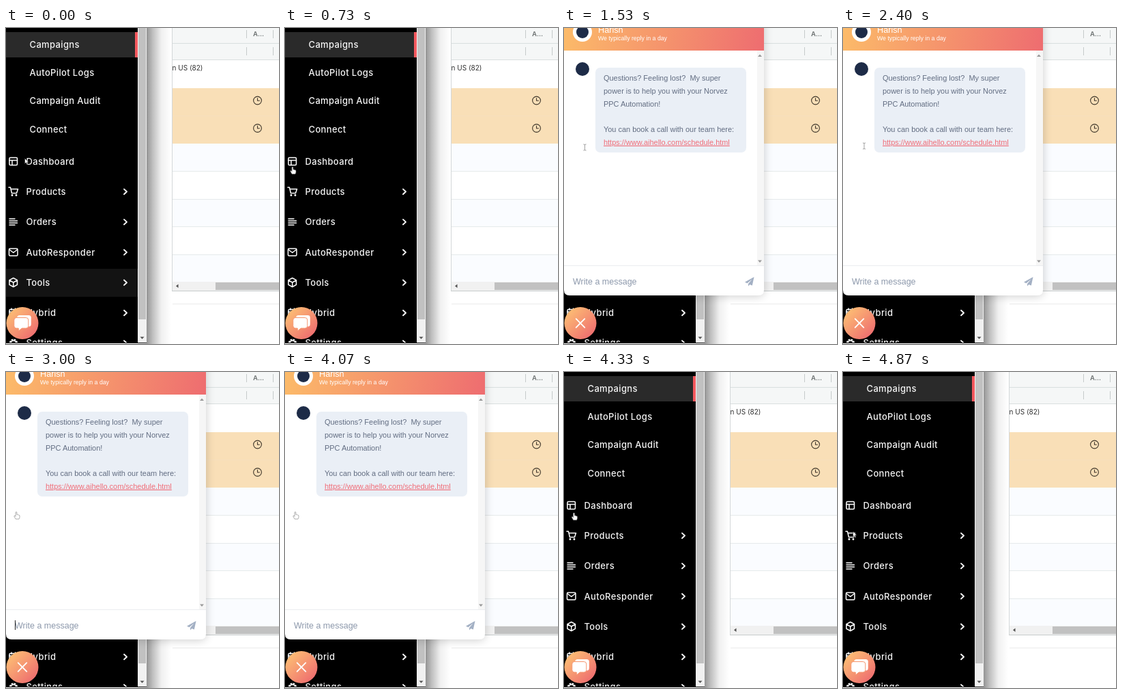
Animation of 400x462 px, one loop 4.94 s. Source, as an HTML page:

```html
<!DOCTYPE html>
<html lang="en">
<head>
<meta charset="utf-8">
<title>Help chat</title>
<style>
  html, body { margin: 0; width: 100%; height: 100%; overflow: hidden; background: #fff; }
  svg { display: block; width: 100%; height: 100%; }
  .nav { font: 500 13px Inter, sans-serif; letter-spacing: .35px; fill: #f4f4f4; }
  .chat { font-family: "Liberation Sans", Arial, sans-serif; }
  .line { fill: none; stroke: #fff; stroke-width: 1.5; stroke-linecap: round; stroke-linejoin: round; }
</style>
</head>
<body>
<svg viewBox="0 0 400 462" xmlns="http://www.w3.org/2000/svg">
  <defs>
    <linearGradient id="head" gradientUnits="userSpaceOnUse" x1="0" y1="0" x2="285" y2="60">
      <stop offset="0" stop-color="#fcbb69"/><stop offset="1" stop-color="#ee6d70"/>
    </linearGradient>
    <linearGradient id="warm" x1=".1" y1=".1" x2=".9" y2=".9">
      <stop offset="0" stop-color="#fdbf74"/><stop offset="1" stop-color="#ee6c6f"/>
    </linearGradient>
    <linearGradient id="shade">
      <stop offset="0" stop-opacity=".42"/><stop offset=".25" stop-opacity=".25"/>
      <stop offset=".6" stop-opacity=".06"/><stop offset="1" stop-opacity="0"/>
    </linearGradient>
    <filter id="soft" x="-20%" y="-20%" width="140%" height="140%"><feGaussianBlur stdDeviation="7"/></filter>
    <clipPath id="side"><rect width="193" height="460"/></clipPath>
  </defs>

  <rect width="400" height="462" fill="#fff"/>
  <g id="table"></g>
  <rect x="206" width="36" height="462" fill="url(#shade)"/>

  <rect width="206" height="461"/>
  <g clip-path="url(#side)">
    <rect y="6" width="193" height="37" fill="#2a2a2a"/>
    <rect x="189" y="6" width="4" height="37" fill="#f4595f"/>
    <rect id="hover" y="352" width="193" height="41" fill="#131313"/>
    <g id="menu"></g>
    <g class="line">
      <rect x="5" y="189.500" width="11.500" height="11" rx="1.500"/>
      <path d="M5 193.500H16.500M9 193.500V200.500"/>
      <path d="M4 233H6.500L8.500 241.500H15.500L17.500 235.500H7.500"/>
      <circle cx="9" cy="244.500" r=".7"/><circle cx="15" cy="244.500" r=".7"/>
      <path d="M5 279H13M5 282H16.500M5 285H16.500M5 288H13"/>
      <rect x="4.500" y="322.500" width="12.500" height="10.500" rx="1.500"/>
      <path d="M5 324L10.800 328.500L16.500 324"/>
      <path d="M10.800 365.500L16.500 368.700V375.300L10.800 378.500L5 375.300V368.700ZM5.300 369L10.800 372L16.200 369M10.800 372V378"/>
      <rect x="5" y="411.500" width="11.500" height="11" rx="1.500"/>
      <path d="M8 410V412.500M13.500 410V412.500M5 415H16.500"/>
      <circle cx="11" cy="460.500" r="4.800" stroke-width="2.500" stroke-dasharray="2.600 1.170" stroke-linecap="butt"/>
      <circle cx="11" cy="460.500" r="3.600"/>
    </g>
  </g>
  <rect x="193" width="13" height="460" fill="#f1f1f1"/>
  <rect x="194" width="11" height="426" fill="#c1c1c1"/>
  <path d="M196.500 451.500H202.500L199.500 454.800Z" fill="#505050"/>

  <g id="panel">
    <rect x="3" y="-20" width="290" height="412" rx="8" opacity=".2" filter="url(#soft)"/>
    <path d="M0 -20H293V383Q293 391 285 391H8Q0 391 0 383Z" fill="#fff"/>
    <rect y="-20" width="293" height="53" fill="url(#head)"/>
    <circle cx="27" cy="6" r="14" fill="#fff"/>
    <circle cx="27" cy="6" r="9" fill="#1d2b47"/>
    <circle cx="27" cy="60" r="10" fill="#1d2b47"/>
    <g class="chat" fill="#fff">
      <text x="50" y="7.300" font-size="12.700">Harish</text>
      <text x="50" y="17.500" font-size="8.750">We typically reply in a day</text>
    </g>
    <rect x="46" y="58" width="221" height="124" rx="7" fill="#eaeff6"/>
    <g id="message" class="chat" font-size="10.950" fill="#626d82"></g>
    <rect x="283" y="33" width="10" height="314" fill="#f6f6f6"/>
    <path d="M284 42H290L287 38.500ZM284 339.500H290L287 343Z" fill="#9a9a9a"/>
    <rect y="347" width="293" height="1" fill="#ebedf0"/>
    <text class="chat" x="13" y="374.500" font-size="12.500" fill="#8c98ab">Write a message</text>
    <path d="M278.500 364L265 371.500L268.500 373.200L275.500 367.300L270 374V377.500L272.200 375L275.800 376.500Z" fill="#a3b0c4"/>
    <rect id="caret" x="13" y="363" width="1" height="14" fill="#222"/>
  </g>

  <circle cx="24" cy="431.500" r="23.500" fill="url(#warm)"/>
  <g id="bubbles" fill="#fff">
    <rect x="-8" y="-11.500" width="20.500" height="16.500" rx="3.500"/>
    <path d="M-9 -8H5Q8.500 -8 8.500 -4.500V4Q8.500 7.500 5 7.500H-1L-6 11.500V7.500H-9Q-12.500 7.500 -12.500 4V-4.500Q-12.500 -8 -9 -8Z" stroke="#f5956f" stroke-width="1"/>
  </g>
  <path id="cross" d="M-6.300 -6.300L6.300 6.300M6.300 -6.300L-6.300 6.300" fill="none" stroke="#fff" stroke-width="1.900" stroke-linecap="round"/>

  <g id="cursor">
    <path id="arrow" d="M0 0V8L1.900 6.300L3.200 9.200L4.600 8.600L3.400 5.700H5.800Z" fill="#fff" stroke="#111" stroke-width=".6"/>
    <path id="hand" d="M-.9 .6Q0 -.8 .9 .6V4Q2 3.300 2.600 4.400Q3.600 3.800 4 4.900Q5 4.600 5 5.800V7.500Q5 9 4 10.500H-.8L-3 6.800Q-3.300 5.300 -2 5.600L-.9 6.700Z" fill="#fff" stroke="#777" stroke-width=".6"/>
    <path id="beam" d="M-2 -4.500Q0 -4.500 0 -3.500Q0 -4.500 2 -4.500M0 -3.500V3.500M-2 4.500Q0 4.500 0 3.500Q0 4.500 2 4.500" fill="none" stroke="#888" stroke-width=".8"/>
  </g>
</svg>

<script>
const LOOP = 4940, STEP = 1000 / 15;
const $ = id => document.getElementById(id);
const rect = (x, y, w, h, fill) => `<rect x="${x}" y="${y}" width="${w}" height="${h}" fill="${fill}"/>`;
const text = (x, y, s, more = '') => `<text x="${x}" y="${y}" ${more}>${s}</text>`;
const clamp = v => Math.max(0, Math.min(1, v));
const ramp = (t, a, b) => clamp((t - a) / (b - a));
const smooth = p => p * p * (3 - 2 * p);
const within = (t, a, b) => t >= a && t < b;

function buildMenu() {
  const subs = ['Campaigns', 'AutoPilot Logs', 'Campaign Audit', 'Connect'];
  const mains = ['Dashboard', 'Products', 'Orders', 'AutoResponder', 'Tools', 'Hybrid', 'Settings'];
  let out = subs.map((s, i) => text(34.5, 28.7 + i * 41.3, s, 'class="nav"')).join('');
  mains.forEach((s, i) => {
    const y = 195 + i * 44.3;
    out += text(29.5, y + 4.6, s, 'class="nav"');
    if (i) out += `<path d="M173 ${y - 3.7}L177 ${y}L173 ${y + 3.7}" class="line" style="stroke-width:1.9"/>`;
  });
  $('menu').innerHTML = out;
}

function buildTable() {
  let out = rect(244, 0, 156, 46, '#f5f7f7') + rect(244, 22, 156, 1, '#d9dfdf') + rect(244, 46, 156, 1, '#d9dfdf');
  for (const x of [352, 391]) out += rect(x, 3, 1, 12, '#c5caca') + rect(x, 28, 1, 12, '#c5caca');
  out += text(362, 12, 'A...', 'font-family="Inter, sans-serif" font-size="9.5" font-weight="600" fill="#6b7070"');
  out += text(243.5, 61.5, 'n US (82)', 'font-family="Inter, sans-serif" font-size="10" fill="#333"');
  out += rect(244, 88, 156, 81, '#f9dfb7') + rect(244, 128, 156, 1, '#f7dfbd');
  for (const y of [106, 146.5])
    out += `<g fill="none" stroke="#40382c" stroke-width="1.1"><circle cx="368.500" cy="${y}" r="5.900"/><path d="M368.500 ${y - 3.8}V${y + .3}H371.800"/></g>`;
  for (let i = 0; i < 5; i++) {
    const y = 169 + i * 40.4;
    out += rect(244, y, 156, 40.4, i % 2 ? '#fff' : '#fafcff');
    if (i) out += rect(244, Math.round(y), 156, 1, '#e6eaeb');
  }
  out += rect(244, 371, 156, 13, '#f1f1f1') + rect(307, 372, 93, 11, '#c1c1c1');
  out += '<path d="M252.500 374.500V380L249 377.200Z" fill="#505050"/>';
  out += rect(243, 0, 1, 385, '#d3d7d8') + rect(243, 384, 157, 1, '#c6cbcc') + rect(244, 403, 156, 1, '#ebebeb');
  $('table').innerHTML = out;
}

function buildMessage() {
  const lines = ['Questions? Feeling lost?&#160; My super', 'power is to help you with your Norvez',
    'PPC Automation!', '', 'You can book a call with our team here:'];
  $('message').innerHTML = lines.map((s, i) => text(58, 77 + i * 18.75, s)).join('') +
    text(58, 170.8, 'https://www.aihello.com/schedule.html', 'fill="#f06d78" text-decoration="underline"');
}

// start, end, x, y: where the pointer travels to
const moves = [
  [0, 460, 11, 203], [1200, 1530, 30.5, 174.5], [1670, 1860, 31, 172.5],
  [2540, 2990, 15, 204.5], [4130, 4190, 14.5, 206], [4400, 4730, 14.5, 233]
];

function pointer(t) {
  let x = 27.5, y = 190.5;
  for (const [a, b, tx, ty] of moves) {
    const p = smooth(ramp(t, a, b));
    x += (tx - x) * p;
    y += (ty - y) * p;
  }
  return [x, y];
}

function shape(t) {
  if (within(t, 260, 1330) || within(t, 2860, 4530)) return 'hand';
  if (within(t, 1460, 2660)) return 'beam';
  return 'arrow';
}

function place(id, x, y, scale, turn = 0) {
  $(id).setAttribute('transform', `translate(${x} ${y}) rotate(${turn}) scale(${scale})`);
}

function draw(now) {
  const t = Math.floor((now % LOOP + 5) / STEP) * STEP;

  const opening = 1 - (1 - ramp(t, 733, 1133)) ** 2;
  const open = opening * (1 - ramp(t, 4067, 4267));
  $('panel').setAttribute('opacity', open);
  $('panel').setAttribute('transform', `translate(0 ${10 * (1 - open)})`);
  $('hover').setAttribute('opacity', 1 - ramp(t, 0, 330));

  const caret = within(t, 1790, 2390) || within(t, 2920, 3395) || within(t, 3925, 4060);
  $('caret').setAttribute('opacity', caret ? 1 : 0);

  const swap = ramp(t, 733, 1000) * (1 - ramp(t, 4067, 4333));
  place('bubbles', 24.3, 431.5, 1 - swap * .6);
  $('bubbles').setAttribute('opacity', clamp(2 - swap * 2.6));
  place('cross', 24, 431.5, .4 + swap * .6, (swap - 1) * 45);
  $('cross').setAttribute('opacity', clamp(swap * 2 - 1));

  place('cursor', ...pointer(t), 1);
  const kind = shape(t);
  for (const id of ['arrow', 'hand', 'beam']) $(id).setAttribute('opacity', id === kind ? 1 : 0);
}

buildMenu();
buildTable();
buildMessage();
const start = performance.now();
function tick() {
  draw(performance.now() - start);
  requestAnimationFrame(tick);
}
tick();
</script>
</body>
</html>
```
